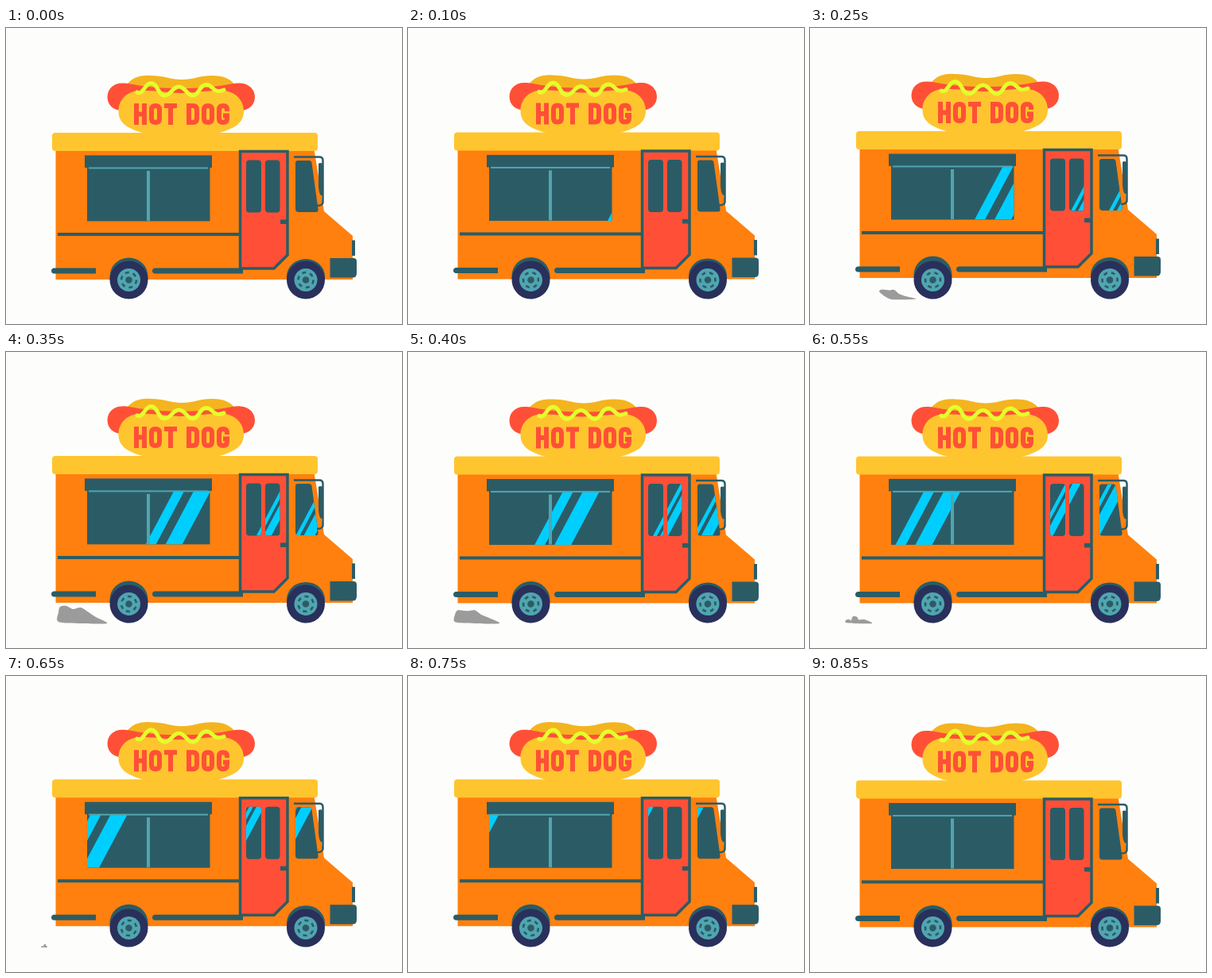
An HTML page for the animation above (900 ms loop, 498 px wide and 373 px high).

```html
<!DOCTYPE html>
<html lang="en">
<head>
<meta charset="utf-8">
<title>Hot dog truck</title>
<style>
  html, body { margin: 0; width: 100%; height: 100%; overflow: hidden; background: #fdfefc; }
  svg { display: block; width: 100vw; height: 100vh; }
  .dark { fill: #2b5c66; }
  .line { fill: none; stroke: #2b5c66; }
  .pale { fill: #50a5b0; }
  .sun { fill: #ffc52e; }
  .red { fill: #ff5037; }
  .glint { fill: #00ceff; }
</style>
</head>
<body>
<svg viewBox="0 0 498 373" role="img" aria-label="Food truck with a HOT DOG sign">
  <defs>
    <clipPath id="shopClip"><rect x="102" y="175" width="154.5" height="68.5"/></clipPath>
    <clipPath id="doorClip">
      <rect x="302" y="166.500" width="19" height="66" rx="4"/>
      <rect x="326" y="166.500" width="18.500" height="66" rx="4"/>
    </clipPath>
    <clipPath id="cabClip"><path id="cabShape" d="M367 167H381Q384 167 384.500 170L392.500 228Q393 232 390 232H368Q364 232 364 228V170Q364 167 367 167Z"/></clipPath>
    <g id="wheel">
      <circle r="24" fill="#29305b"/>
      <circle r="14.500" class="pale"/>
      <circle r="9.500" class="line" stroke-width="2.600" stroke-dasharray="5 4.950"/>
      <circle r="4.300" class="dark"/>
    </g>
  </defs>

  <path id="smoke" fill="#9b9b9b"/>

  <g id="truck">
    <!-- sign -->
    <path fill="#f4b41f" d="M150 74C158 62 169 59 182 60C199 60 207 65 221 65C236 65 243 60 259 60C274 60 284 64 290 75V92H150Z"/>
    <path class="red" d="M146 69.500C158 69 170 76 220 76C270 76 281 69 295 69.500C306 70 313 78 313 87C313 97 305 104 295 104H146C135 104 127.500 97 127.500 87C127.500 77 135 69.500 146 69.500Z"/>
    <path class="sun" d="M167 79C185 78 202 82 220 82C238 82 255 78 273 79C289 80 299 91 299 105C299 120 287 127 265 133H175C153 127 141.500 120 141.500 105C141.500 91 151 80 167 79Z"/>
    <path fill="none" stroke="#e4ff2c" stroke-width="5" stroke-linecap="round" d="M165 81C173 85 174 69.500 182.500 69.500S191 85 199.500 85S209 74 217.500 74S227 85 235 85S243 71.500 252 71.500S260 84 274 78"/>
    <g id="sign" fill="none" stroke="#ff5037" stroke-width="6"/>

    <!-- body -->
    <path fill="#ff800e" d="M62.500 150H387L400 231L436 262V317H345L355 303H130V317H62.500Z"/>
    <path fill="#ff800e" d="M128 300H358L345 317H128Z"/>
    <rect class="sun" x="58" y="132" width="334" height="23" rx="4"/>
    <path class="line" stroke-width="4" d="M65 260H293"/>
    <path class="dark" d="M60 302.500H113V309.500H60Q57 309 57 306T60 302.500ZM187 302.500H298V309.500H187Q184 309 184 306T187 302.500Z"/>
    <path class="dark" d="M130.500 317V313A24 23.500 0 0 1 178.500 313V317ZM353 317V313A24 22 0 0 1 401 313V317Z"/>

    <!-- serving window -->
    <rect class="dark" x="102" y="170" width="154.500" height="73.500"/>
    <g clip-path="url(#shopClip)"><path class="glint" id="shop"/></g>
    <rect class="pale" x="177" y="180" width="4" height="63"/>
    <rect class="dark" x="99" y="160.500" width="160" height="15.500"/>
    <rect class="pale" x="104" y="175.500" width="150" height="2"/>

    <!-- door -->
    <path class="red" stroke="#2b5c66" stroke-width="3.500" d="M294.500 155.500H354V286L337 303H294.500Z"/>
    <rect class="dark" x="302" y="166.500" width="19" height="66" rx="4"/>
    <rect class="dark" x="326" y="166.500" width="18.500" height="66" rx="4"/>
    <g clip-path="url(#doorClip)"><path class="glint" id="door"/></g>
    <rect class="dark" x="345" y="241.500" width="10" height="5.500"/>

    <!-- cab -->
    <use href="#cabShape" class="dark"/>
    <g clip-path="url(#cabClip)"><path class="glint" id="cab"/></g>
    <path class="line" stroke-width="2.500" d="M362 162.500H394Q398.500 162.500 398.500 167V220Q398 224 391 224"/>
    <path class="dark" d="M393 171Q395 169 398 171V211H396Q393.500 208 393 200Z"/>
    <rect class="dark" x="435" y="267.500" width="4" height="19.500"/>
    <path class="dark" d="M407.500 290H437Q441 290 441 294V309Q441 314.500 436 314.500H407.500Z"/>
  </g>

  <g transform="translate(154.500 317.500)"><use href="#wheel" class="spin"/></g>
  <g transform="translate(377 317.500)"><use href="#wheel" class="spin"/></g>
</svg>
<script>
const LOOP = 900, STEP = 50;
const $ = id => document.getElementById(id);
const spins = document.querySelectorAll('.spin');

// Condensed block letters in a 16 x 27 cell
const letters = {
  H: 'M3 0V27M13 0V27M3 13.5H13',
  O: 'M8 3Q13 3 13 8V19Q13 24 8 24Q3 24 3 19V8Q3 3 8 3Z',
  T: 'M0 3H16M8 0V27',
  D: 'M3 3H8Q13 3 13 8V19Q13 24 8 24H3Z',
  G: 'M13 10V8Q13 3 8 3Q3 3 3 8V19Q3 24 8 24Q13 24 13 19V15.500H8'
};
function word(text, x) {
  return [...text].map((c, i) =>
    `<path d="${letters[c]}" transform="translate(${x + i * 19} 95)"/>`).join('');
}
$('sign').innerHTML = word('HOT', 161) + word('DOG', 227);

// Outlines of the exhaust puff: time, then x,y pairs
const puffs = [
  [100, 136,341, 137,340, 138,340, 139,340, 140,340, 141,340, 142,341, 141,342, 139,342, 137,342],
  [250, 87,332, 91,329.5, 100,330.5, 106,330, 112,335, 120,338, 133,341, 127,342, 103,342, 94,338],
  [350, 66,328, 68,321, 76,320, 84,324, 94,322, 104,328, 113,334, 127,342, 95,342, 66,340],
  [500, 45,337, 50,335, 54,337, 57,331, 64,332, 67,336, 78,336, 91,342, 62,342, 46,341],
  [650, 44,341, 46,340, 47,341, 48,338, 50,338, 50,340, 51,340, 52,342, 48,342, 45,342]
];

function smoothPath(p) {
  const n = p.length / 2;
  const at = i => { const k = (i + n) % n; return [p[2 * k], p[2 * k + 1]]; };
  let d = 'M' + at(0);
  for (let i = 0; i < n; i++) {
    const [a, b, c, e] = [at(i - 1), at(i), at(i + 1), at(i + 2)];
    const c1 = b.map((v, k) => v + (c[k] - a[k]) / 7);
    const c2 = c.map((v, k) => v - (e[k] - b[k]) / 7);
    d += `C${c1} ${c2} ${c}`;
  }
  return d + 'Z';
}

function smokePath(t) {
  if (t <= 100 || t > 650) return '';
  const i = puffs.findIndex(p => t <= p[0]);
  const a = puffs[i - 1], b = puffs[i];
  const k = (t - a[0]) / (b[0] - a[0]);
  return smoothPath(a.slice(1).map((v, j) => v + (b[j + 1] - v) * k));
}

// A narrow and a wide slanted band; x is the lower left corner
function bands(x, top, bottom, narrow, gap, wide) {
  const lean = (bottom - top) * 0.53;
  const band = (l, w) => `M${l} ${bottom}H${l + w}L${l + w + lean} ${top}H${l + lean}Z`;
  return band(x, narrow) + band(x + narrow + gap, wide);
}

function draw(time) {
  let t = Math.floor((time % LOOP) / STEP) * STEP;
  if (t < 100) t = 0;

  const lift = 1 + Math.cos((t - 245) / 450 * 2 * Math.PI);
  $('truck').setAttribute('transform', `translate(0 ${-lift})`);

  const s = t - 100;
  const x = 251 - 0.2806 * s - 0.000085 * s * s;
  $('shop').setAttribute('d', bands(x, 175, 243.5, 13, 12, 21));
  $('door').setAttribute('d', bands(328 + 0.42 * (x - 207), 166, 232.5, 5, 4, 10));
  $('cab').setAttribute('d', bands(376 + 0.36 * (x - 207), 166, 232, 5, 5, 14));

  $('smoke').setAttribute('d', smokePath(t));
  spins.forEach(w => w.setAttribute('transform', `rotate(${t / LOOP * 360})`));
}

const start = performance.now();
function tick() {
  draw(performance.now() - start);
  requestAnimationFrame(tick);
}
draw(0);
requestAnimationFrame(tick);
</script>
</body>
</html>
```
